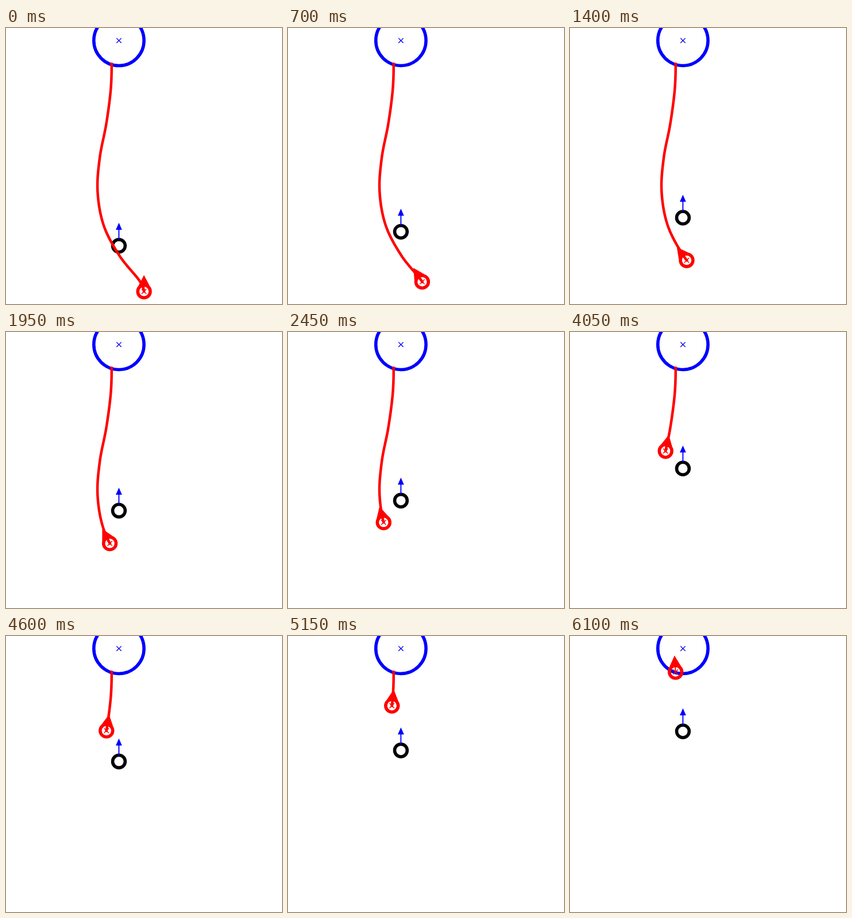
An HTML page that plays this animation: 480 by 480 pixels, repeating every 6150 ms.

```html
<!DOCTYPE html>
<html lang="en">
<head>
<meta charset="utf-8">
<title>Path following</title>
<style>
  html, body { margin: 0; width: 100%; height: 100%; overflow: hidden; background: #fff; }
  svg { display: block; width: 100vw; height: 100vh; }
  .ring { fill: none; stroke-width: 5.56; }
  .thin { fill: none; stroke-width: 1.4; }
  .stem { fill: none; stroke-width: 1.9; }
  .blue { stroke: #00f; }
  .red { stroke: #f00; }
  .trail { fill: none; stroke-width: 4.5; stroke-linecap: square; stroke-linejoin: round; }
</style>
</head>
<body>
<svg viewBox="0 0 480 480">
  <defs><path id="cross" d="M-4.2-4.2l8.4 8.4m0-8.4l-8.4 8.4"/></defs>
  <g transform="translate(196.36 21.82)">
    <circle class="ring blue" r="43.64"/>
    <use class="thin blue" href="#cross"/>
  </g>
  <g id="walker">
    <circle class="ring" stroke="#000" r="10.91"/>
    <path class="stem blue" d="M0-10.9V-30"/>
    <path fill="#00f" d="M0-40L5.4-27.8H-5.4Z"/>
  </g>
  <path id="trail" class="trail red"/>
  <g id="robot">
    <circle class="ring red" r="10.91"/>
    <use class="thin red" href="#cross"/>
    <g id="heading">
      <path class="stem red" d="M0 0V-12"/>
      <path fill="#f00" d="M0-28.5L10-9.5H-10Z"/>
    </g>
  </g>
</svg>
<script>
  const STEP = 50, LOOP = 6150, END = 6100;

  // Waypoints the robot passes at equal time intervals.
  const route = [
    [240, 458.2], [231.7, 438.9], [197.4, 396.1], [169.9, 343.3], [159.3, 284.3],
    [163.1, 225.3], [174.4, 166.6], [182.1, 107.8], [183.6, 62.5]
  ];
  const LAST = route.length - 1, SPAN = END / LAST;
  const startVelocity = [0, -6], endVelocity = [-1, -15];

  function velocity(i, axis) {
    if (i === 0) return startVelocity[axis];
    if (i === LAST) return endVelocity[axis];
    return (route[i + 1][axis] - route[i - 1][axis]) / 2;
  }

  function hermite(t, axis) {
    const i = Math.max(0, Math.min(LAST - 1, Math.floor(t / SPAN)));
    const u = t / SPAN - i, v = 1 - u;
    return route[i][axis] * (1 + 2 * u) * v * v
         + route[i + 1][axis] * (1 + 2 * v) * u * u
         + u * v * (velocity(i, axis) * v - velocity(i + 1, axis) * u);
  }

  const at = t => [hermite(t, 0), hermite(t, 1)];
  const points = Array.from({ length: END / STEP + 1 }, (_, k) => at(k * STEP));

  function angle(t) {
    const [x0, y0] = at(t - 1), [x1, y1] = at(t + 1);
    return Math.atan2(x1 - x0, y0 - y1) * 180 / Math.PI;
  }

  const [walker, trail, robot, heading] =
    ["walker", "trail", "robot", "heading"].map(id => document.getElementById(id));
  const move = (el, x, y) => el.setAttribute("transform", `translate(${x} ${y})`);

  function draw(now) {
    const k = Math.floor(now % LOOP / STEP);
    move(walker, 196.36, 378.8 - 1.7455 * k);
    move(robot, ...points[k]);
    heading.setAttribute("transform", `rotate(${angle(k * STEP)})`);
    const rest = points.slice(k);
    trail.setAttribute("d", rest.length > 1 ? "M" + rest.join("L") : "");
  }

  const start = performance.now();
  function tick() {
    draw(performance.now() - start);
    requestAnimationFrame(tick);
  }
  tick();
</script>
</body>
</html>
```
